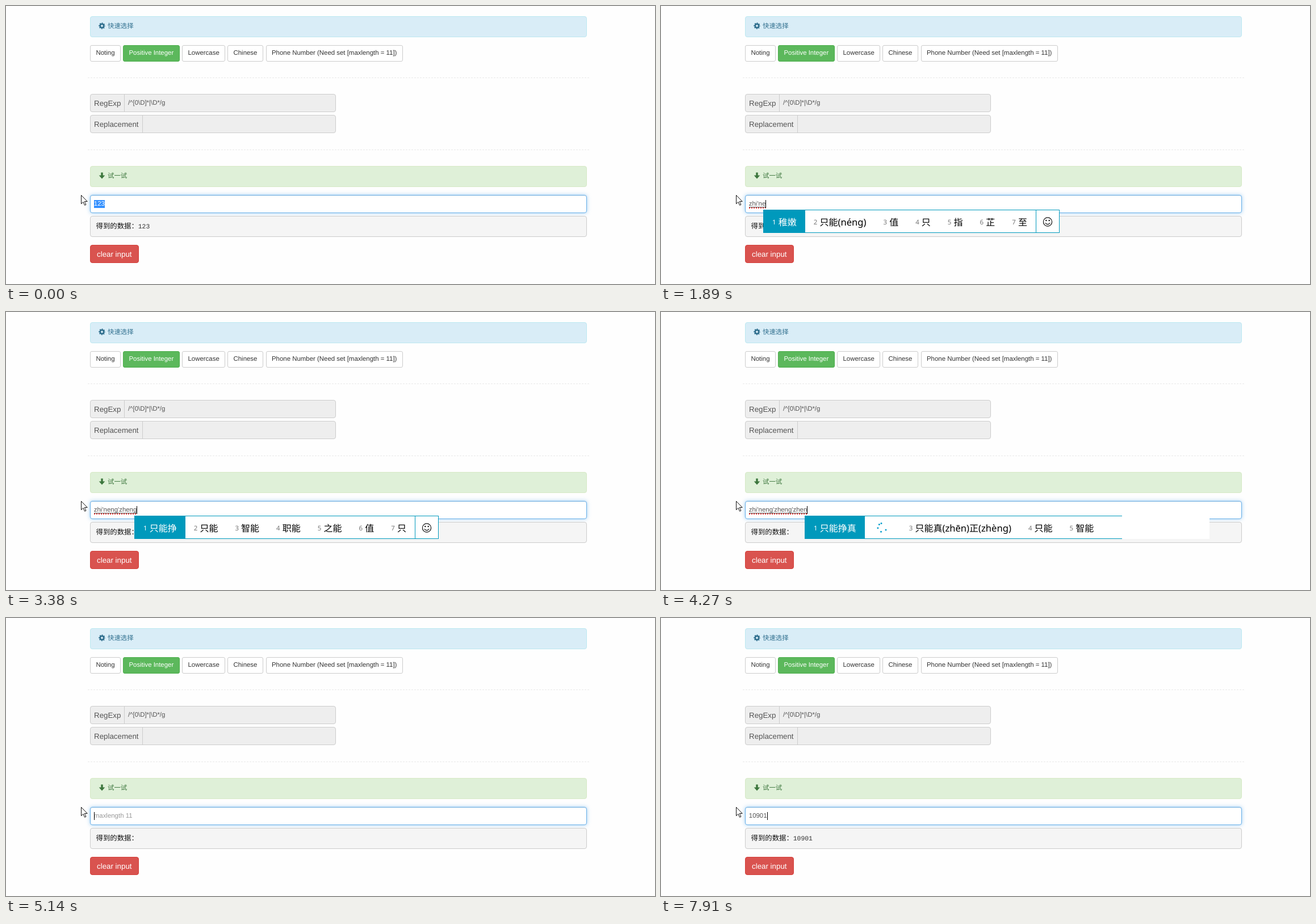
Recreate the animation shown at these times as an HTML page. Size 1143x490 px, loop 8 s.

```html
<!DOCTYPE html>
<html lang="zh-CN">
<head>
<meta charset="utf-8">
<title>Input filter demo</title>
<style>
html, body { margin: 0; width: 100%; height: 100%; overflow: hidden; background: #fefefe; }
body { position: relative; font: 11.43px "Liberation Sans", "Noto Sans CJK SC", sans-serif; color: #333; text-rendering: geometricPrecision; }
body > * { position: absolute; box-sizing: border-box; white-space: nowrap; }
svg { display: block; overflow: visible; }
.box { left: 148px; width: 875px; height: 37px; line-height: 34px; border: 1px solid; border-radius: 4px; padding-left: 30px; }
.info { top: 18px; background: #d9edf7; border-color: #bce8f1; color: #31708f; }
.success { top: 282px; background: #dff0d8; border-color: #d6e9c6; color: #3c763d; }
.btn { top: 69px; height: 29px; line-height: 27px; padding: 0 9.5px; border: 1px solid #ccc; border-radius: 3px; background: #fff; }
.on { background: #5cb85c; border-color: #4cae4c; color: #fff; }
.clear { top: 421px; left: 148px; height: 32px; line-height: 31px; padding: 0 11px; border-radius: 4px; font-size: 13.33px; background: #d9534f; border-color: #d43f3a; color: #fff; }
hr { left: 144px; width: 884px; height: 1px; margin: 0; border: 0; background: repeating-linear-gradient(90deg, #e8e8e8 0 3px, transparent 3px 5px); }
.group { left: 148px; width: 433px; height: 32px; line-height: 31px; display: flex; border: 1px solid #ccc; border-radius: 4px; background: #eee; color: #555; }
.group b { font-weight: 400; font-size: 13.33px; padding: 0 6px; border-right: 1px solid #ccc; }
.group span { padding-left: 5.5px; }
.field { left: 148px; top: 333px; width: 875px; height: 32px; border: 1px solid #66afe9; border-radius: 4px; background: #fff; box-shadow: inset 0 1px 1px rgba(0,0,0,.075), 0 0 7px rgba(102,175,233,.6); }
.result { top: 370px; line-height: 35px; padding-left: 9.5px; background: #f5f5f5; border-color: #ccc; color: #111; font-size: 12.38px; }
#data { font: 11.4px "Liberation Mono", monospace; color: #333; }
#text { left: 154.8px; top: 333px; line-height: 32px; color: #555; }
#text.sel { background: #3390ff; color: #fff; top: 342px; height: 14px; line-height: 14px; }
#text.hint { color: #999; }
#text.comp::after { content: ""; position: absolute; left: 0; right: 0; top: 21px; height: 2px; border-top: 1px solid #555; background: repeating-linear-gradient(90deg, #e33 0 2px, transparent 2px 4px); }
#caret { top: 342px; width: 1px; height: 14px; background: #000; }
#popup { top: 359px; height: 41px; display: flex; border: 1px solid #0099bc; border-left-width: 1px; background: #fff; color: #000; font: 16px/41px "Noto Sans CJK SC", sans-serif; }
#popup .item { padding: 0 15px; display: flex; height: 39px; }
#popup .item:first-child { background: #0099bc; color: #fff; }
#popup i { width: 10.7px; font: 11.5px/43px "Noto Sans", sans-serif; color: #777; }
#popup .item:first-child i { color: #fff; }
#popup small { font: 16.6px/41px "Noto Sans", sans-serif; }
.face { width: 40px; height: 39px; border-left: 1px solid #0099bc; }
.spin { width: 63px; height: 39px; }
#popup.partial { width: 559px; border-right: 0; }
#popup.partial::after { content: ""; position: absolute; left: 100%; top: -1px; width: 154px; height: 41px; background: #fff; }
</style>
</head>
<body>
<div class="box info">快速选择</div>
<svg style="left:169px;top:35px" width="1" height="1" fill="none" stroke="#31708f">
  <circle r="3.2" stroke-width="2.6"/>
  <circle r="4.8" stroke-width="1.9" stroke-dasharray="1.9 1.87" stroke-dashoffset=".95"/>
</svg>
<div class="btn" style="left:148px">Noting</div>
<div class="btn on" style="left:206px">Positive Integer</div>
<div class="btn" style="left:310px">Lowercase</div>
<div class="btn" style="left:390px">Chinese</div>
<div class="btn" style="left:457.5px">Phone Number (Need set [maxlength = 11])</div>
<hr style="top:126px">
<div class="group" style="top:155px"><b>RegExp</b><span>/^[0\D]*|\D*/g</span></div>
<div class="group" style="top:192px"><b>Replacement</b></div>
<hr style="top:253px">
<div class="box success">试一试</div>
<svg style="left:169px;top:299px" width="1" height="1" fill="#3c763d"><path d="M-1.7-5.5h3.4v5h3.6L0 5.5-5.3-.5h3.6z"/></svg>
<div class="field"></div>
<div class="box result">得到的数据：<span id="data"></span></div>
<div class="btn clear">clear input</div>
<div id="text"></div>
<div id="caret"></div>
<div id="popup"></div>
<svg style="left:131.5px;top:333px" width="12" height="19" fill="#fff" stroke="#111"><path d="M.5.5v15.2l3.5-3.3 2.6 5.8 2.3-1-2.6-5.7h4.9z"/></svg>

<script>
const LOOP = 8000, SPIN = 1340;
const $ = id => document.getElementById(id);
const text = $("text"), caret = $("caret"), popup = $("popup"), data = $("data");

const zhine = "稚嫩 只能(néng) 值 只 指 芷 至";
const zhong = "只能 智能 职能 之能";

// [start, typed pinyin, candidates ("*" = loading), partly painted]
const typing = [
  [1210, "z", ""],
  [1240, "z", "在 中 这 子 则 只 字"],
  [1390, "zh", "这 中 只 着 之 种 主"],
  [1540, "zhi", "只 * 之 指 值 至 直"],
  [1560, "zhi", "只 之 指 值 至 直 知"],
  [1710, "zhi'n", "只能 智能 职能 指南 执念 之内 稚嫩"],
  [1860, "zhi'ne", zhine],
  [1920, "zhi'nen", zhine],
  [2080, "zhi'neng", zhong + " 值 只 指"],
  [2620, "zhi'neng'z", "只能在 智能组 只能做 智能在 只能再 智能中 只能"],
  [2970, "zhi'neng'zh", "只能这 智能中 " + zhong + " 值"],
  [3090, "zhi'neng'zhe", "只能这 " + zhong + " 值 只"],
  [3200, "zhi'neng'zhen", "只能真 " + zhong + " 值 只"],
  [3380, "zhi'neng'zheng", "只能挣 " + zhong + " 值 只"],
  [3680, "zhi'neng'zheng'z", "只能挣在 * " + zhong + " 值"],
  [3880, "zhi'neng'zheng'zh", "只能挣这 * " + zhong + " 值"],
  [4070, "zhi'neng'zheng'zhe", "只能挣着 * " + zhong + " 值"],
  [4270, "zhi'neng'zheng'zhen", "只能挣真 * 只能真(zhēn)正(zhèng) 只能 智能", true],
  [4300, "zhi'neng'zheng'zhen", "只能挣真 * 只能真(zhēn)正(zhèng) " + zhong],
  [4400, "zhi'neng'zheng'zheng", "只能正整 * " + zhong + " 值"],
  [4530, "zhi'neng'zheng'zheng's", "只能正整数 * " + zhong + " 值"],
  [4640, "zhi'neng'zheng'zheng'sh", "只能正整数 * " + zhong + " 值"],
  [4800, "zhi'neng'zheng'zheng'shu", "只能正整数 * " + zhong + " 值"],
  [4920, "zhi'neng'zheng'zheng'shu", "只能正整数 只能整整数 " + zhong + " 值能"]
].map(([at, value, words, partial]) => ({ at, value, words, partial, kind: "comp" }));

const hint = (at, hideCaret) => ({ at, value: "maxlength 11", kind: "hint", hideCaret });
const digits = (at, value) => ({ at, value, kind: "", result: value });

const states = [
  { at: 0, value: "123", kind: "sel", result: "123", hideCaret: true },
  ...typing,
  hint(5140), hint(5660, true), hint(6190), hint(6720, true), hint(7250),
  digits(7460, "1"), digits(7640, "109"), digits(7820, "1090"), digits(7910, "10901")
];

const spinner = `<div class="spin"><svg width="63" height="39" fill="#0a9fcd">${'<circle r="1.5"/>'.repeat(5)}</svg></div>`;
const face = `<div class="face"><svg width="40" height="39" fill="none" stroke="#111" stroke-width="1.2">
  <circle cx="20" cy="20.5" r="7.6"/><path d="M15.8 22.3q4.2 5 8.4 0"/>
  <g fill="#111" stroke="none"><circle cx="17.3" cy="18" r="1.2"/><circle cx="22.7" cy="18" r="1.2"/></g></svg></div>`;

function candidate(word, i) {
  if (word === "*") return spinner;
  const label = word.replace(/\([^)]*\)/g, "<small>$&</small>");
  return `<div class="item"><i>${i + 1}</i><span>${label}</span></div>`;
}

function show(s) {
  text.textContent = s.value;
  text.className = s.kind;
  data.textContent = s.result || "";
  const end = 154.8 + (s.kind === "hint" ? 0 : text.getBoundingClientRect().width);
  caret.style.left = Math.round(end) + "px";
  caret.style.visibility = s.hideCaret ? "hidden" : "visible";
  popup.style.display = s.words ? "flex" : "none";
  popup.style.left = Math.round(end - 4) + "px";
  popup.className = s.partial ? "partial" : "";
  popup.innerHTML = s.words ? s.words.split(" ").map(candidate).join("") + (s.partial ? "" : face) : "";
}

// Dots slow down at the top of the ring and rush through the bottom.
function spin(t) {
  popup.querySelectorAll(".spin circle").forEach((dot, i) => {
    const u = 2 * Math.PI * ((t - 4670) / SPIN + 0.23 - i * 0.135);
    const a = u - 0.55 * Math.sin(u);
    dot.setAttribute("cx", 30.5 + 7.6 * Math.sin(a));
    dot.setAttribute("cy", 20 - 7.6 * Math.cos(a));
  });
}

let current;
function tick() {
  const t = performance.now() % LOOP;
  const s = states.findLast(x => x.at <= t);
  if (s !== current) show(current = s);
  spin(t);
  requestAnimationFrame(tick);
}
tick();
</script>
</body>
</html>
```
